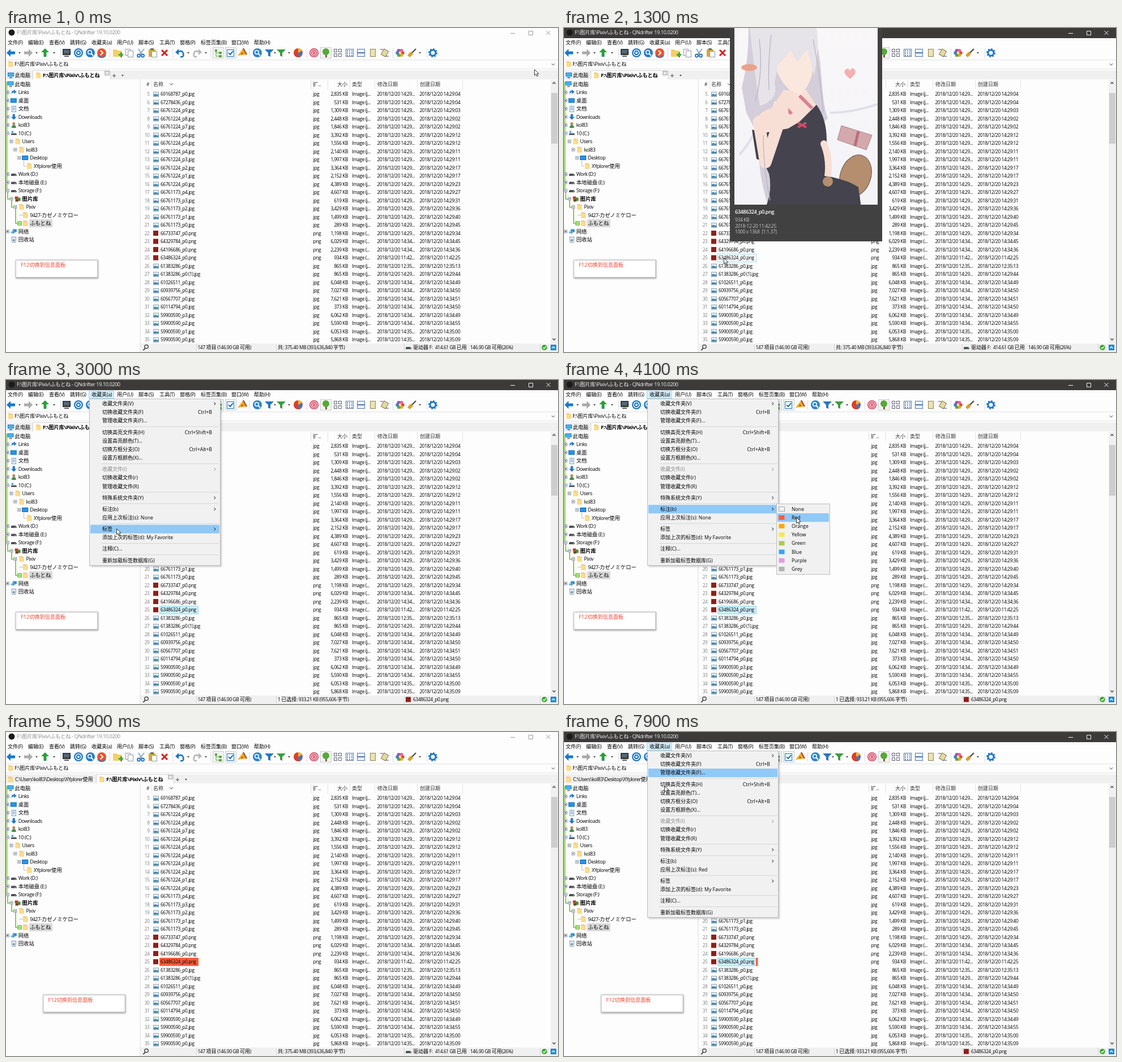
An HTML page that plays this animation: 975x574 px, repeating every 8 s.

```html
<!DOCTYPE html>
<html lang="zh">
<head>
<meta charset="utf-8">
<title>File manager</title>
<style>
html, body { margin: 0; width: 100%; height: 100%; overflow: hidden; background: #fdfdfd; }
svg { display: block; }
text { font-family: "Open Sans", "Noto Sans CJK SC", "Noto Sans CJK", sans-serif; letter-spacing: -.05em; }
text.wide, tspan { letter-spacing: 0; }
</style>
</head>
<body>
<svg id="stage" width="975" height="574" viewBox="0 0 975 574"></svg>
<script>
const LOOP = 8000, STEP = 100;

// ---- drawing helpers; text is placed by its vertical centre ----
const rect = (x, y, w, h, fill, more = '') => `<rect x="${x}" y="${y}" width="${w}" height="${h}" fill="${fill}" ${more}/>`;
const box = (x, y, w, h, fill, stroke, more = '') => rect(x + .5, y + .5, w - 1, h - 1, fill, `stroke="${stroke}" ${more}`);
const dot = (x, y, r, fill, more = '') => `<circle cx="${x}" cy="${y}" r="${r}" fill="${fill}" ${more}/>`;
const line = (d, stroke, w = 1, more = '') => `<path d="${d}" fill="none" stroke="${stroke}" stroke-width="${w}" ${more}/>`;
const fillPath = (d, fill, more = '') => `<path d="${d}" fill="${fill}" ${more}/>`;
const at = (x, y, body, more = '') => `<g transform="translate(${x} ${y}) ${more}">${body}</g>`;
const group = (id, body, more = '') => `<g id="${id}" ${more}>${body}</g>`;
const text = (x, y, s, { size = 8.4, cjk = 9, fill = '#000', anchor = 'start', weight = 400, style = '' } = {}) =>
  `<text class="${style}" x="${x}" y="${y + 3}" font-size="${size}" fill="${fill}" text-anchor="${anchor}" font-weight="${weight}">` +
  s.replace(/[\u3000-\u9fff]+/g, run => `<tspan font-size="${cjk}">${run}</tspan>`) + '</text>';

// ---- small icons, centred on 0,0 ----
const icons = {
  folder: fillPath('M-4-5H1L2-4H4V5H-4Z', '#f2c96c') + fillPath('M-4-3H3V5H-4Z', '#fbdc8c'),
  pc: rect(-5, -5, 11, 7, '#1c7fd0') + rect(-4, -4, 9, 5, '#45b4f2') + rect(-2, 3, 5, 2, '#6c7a86'),
  desktop: rect(-6, -4, 11, 8, '#1467b3') + rect(-5, -3, 9, 6, '#1e96ee'),
  link: fillPath('M-4 4V0Q-4-3 0-3V-5L5-1 0 3V0Q-3 0-4 4Z', '#2b7fd4'),
  doc: box(-4, -5, 8, 11, '#fff', '#7f95a8') + line('M-2-2H2M-2 0H2M-2 2H2', '#4a93d1'),
  down: fillPath('M-2-5H2V0H5L0 5-5 0H-2Z', '#1f78d1'),
  user: dot(0, -2.5, 2.6, '#b98a5a') + fillPath('M-4 5Q-4 0 0 0T4 5Z', '#3f8f4f'),
  drive: fillPath('M-4-1H3L5 1V3H-5V1Z', '#4a4f55') + rect(2, 1, 2, 1, '#8fdc6a'),
  winDrive: rect(-4, -4, 3, 3, '#2f9be8') + fillPath('M-4 0H4L5 1V3H-5V1Z', '#4a4f55'),
  pictures: rect(-5, -4, 6, 5, '#c7382b') + rect(-2, -2, 7, 6, '#4f8d36') + rect(-4, 1, 5, 4, '#7a3b24'),
  net: rect(-2, -4, 7, 5, '#2f8fd8') + fillPath('M-5 0H-1V-2L3 1-1 5V3H-5Z', '#57a7df'),
  bin: fillPath('M-4-5H4L3 5H-3Z', '#dfe7ee', 'stroke="#7d8b99" stroke-width=".8"') + dot(0, 1, 1.7, '#3c86cf'),
  jpg: box(-5, -4, 10, 9, '#dff1fb', '#98a4ad') + fillPath('M-4 3.5V1L-1-.5 1 1 4 .5V3.5Z', '#3b83ad'),
  png: rect(-5, -4.5, 9, 9, '#8d2018')
};
const icon = (name, x, y) => at(x, y, icons[name]);
const caret = (x, y) => fillPath(`M${x - 2} ${y - 1}h4l-2 2.4z`, '#333');
const chevron = (x, y, stroke = '#333') => line(`M${x - 1.5} ${y - 2.5}l2.5 2.5-2.5 2.5`, stroke);
const plus = (x, y, open) => box(x - 3, y - 3, 6, 6, '#fff', '#8c9aa5') +
  line(`M${x - 1.5} ${y}h3` + (open ? '' : `M${x} ${y - 1.5}v3`), '#333', .9);

// ---- window frame ----
const APP = 'QNdrifter 19.10.0200', FOLDER = 'F:\\图片库\\Pixiv\\ふもとね';
const MENU_BAR = [[3, '文件(F)'], [39, '编辑(E)'], [76, '查看(V)'], [113, '跳转(G)'], [151, '收藏夹(a)'], [196, '用户(U)'],
  [234, '脚本(S)'], [271, '工具(T)'], [307, '窗格(P)'], [344, '标签页集(B)'], [398, '窗口(W)'], [438, '帮助(H)']];

const titleBar = (id, bg, ink, buttons) => group(id, rect(0, 0, 975, 18, bg) + dot(10, 8, 5.5, '#1d1b1a') +
  text(19, 8, `${FOLDER} - ${APP}`, { size: 9.2, fill: ink }) +
  line('M891 9.5h8M923.5 5.5h7v7h-7zM954.5 5l7 7m0-7l-7 7', buttons));

function toolbar() {
  const arrow = (x, fill, turn) => at(x, 44, fillPath('M-8 0L-1-7V-2.5H7V2.5H-1V7Z', fill), `rotate(${turn})`);
  const disc = (x, fill, body) => dot(x, 44, 8, fill) + at(x, 44, body);
  const lens = line('M1.5 1.5L5 5', '#fff', 2) + dot(-1, -1, 3.3, 'none', 'stroke="#fff" stroke-width="1.6"');
  const funnel = (x, fill) => fillPath(`M${x - 8} 38h16l-6 6v7l-4-2v-5z`, fill);
  const pressed = x => box(x - 10, 34, 20, 20, '#f1f4f6', '#c9ced2');
  const curve = (x, fill, flip) => at(x, 44, line('M-4-1Q4-6 6 1T1 7', fill, 2.6) + fillPath('M-8-1L-2-7V4Z', fill), `scale(${flip} 1)`);
  let s = arrow(9, '#1679c9', 0) + arrow(39, '#a9abad', 180) + arrow(69, '#2c9c3e', 90);
  s += rect(100, 37, 14, 11, '#333b42') + rect(102, 39, 10, 6, '#566873') + rect(103, 49, 8, 2, '#59636b');
  s += disc(128, '#1c78c8', dot(0, 0, 5, 'none', 'stroke="#fff" stroke-width="1.5"') + dot(0, 0, 2, '#fff'));
  s += disc(149, '#2b7fc4', lens) + disc(169, '#e8552d', line('M-2-4L2 0-2 4', '#fff', 2.2) + line('M-7 4A8 8 0 0 0 7 4', '#2c7cc4', 2));
  s += fillPath('M189 38h6l2 2h7v11h-15z', '#f5cf65') + fillPath('M199 46h3v-3h3v3h2v3h-2v3h-3v-3h-3z', '#39a845');
  s += box(211, 37, 9, 12, '#fff', '#8e9aa5') + box(215, 40, 10, 12, '#fff', '#8e9aa5');
  s += line('M234 37L240 47M244 37L236 47', '#8aa0b4', 1.8) + [234.5, 241.5].map(x => dot(x, 49, 2.5, 'none', 'stroke="#1f6fc0" stroke-width="1.8"')).join('');
  s += rect(252, 38, 12, 13, '#d9a544') + rect(255, 36, 6, 3, '#6d6d6d') + box(257, 41, 10, 11, '#fff', '#8e9aa5');
  s += line('M275 39l10 10m0-10l-10 10', '#d8201c', 3) + curve(307, '#1c74c4', 1) + curve(338, '#b4b6b8', -1);
  s += pressed(375) + rect(369, 38, 4, 4, '#58a832') + rect(376, 42, 5, 4, '#58a832') + rect(376, 48, 5, 4, '#58a832') + line('M371 42v8h5m-5-6h5', '#58a832');
  s += pressed(397) + box(390, 38, 13, 13, '#fff', '#1d6fb8') + line('M393 44l3 3 5-6', '#1d6fb8', 2);
  s += fillPath('M409 49L419 36 425 47Z', '#f0a92f') + line('M419 36L425 47', '#a8551b', 2.4) + dot(417, 45, 1.6, '#cf3c24');
  s += disc(444, '#2c86cf', lens) + funnel(465, '#2277c4') + funnel(486, '#3b9d3d');
  s += dot(516, 44, 8, '#dd3f28') + fillPath('M516 44V36A8 8 0 0 1 523 40Z', '#f6b73c') + fillPath('M516 44L523 41A8 8 0 0 1 518 52Z', '#3c78c4');
  s += [7.2, 4.4, 1.6].map(r => dot(544, 44, r, 'none', 'stroke="#d8405e" stroke-width="1.7"')).join('');
  s += pressed(565) + rect(564, 45, 3, 7, '#8a5a2c') + dot(565, 42, 6, '#58a838');
  s += [579, 587].map(x => [37, 45].map(y => box(x, y, 6, 6, '#f8f8f8', '#667')).join('')).join('');
  s += box(600, 37, 14, 14, '#fff', '#5b7590') + [0, 1, 2].map(i => line(`M602 ${40.5 + i * 4}h10`, '#3d76b4', 2, 'stroke-dasharray="2 2"')).join('');
  s += box(620, 37, 14, 14, '#e9f1fa', '#4a78b4') + rect(620, 43, 14, 2, '#4a78b4') + box(643, 37, 10, 14, '#ece3b0', '#8d8355');
  s += at(669, 44, box(-5, -6, 10, 12, '#e4d9a2', '#857b4e'), 'rotate(30)') + line('M661 38h5m5 12h5', '#444');
  const petals = ['#e2472f', '#f3a71f', '#5ba83b', '#3b7fcc', '#9556b4', '#e25f96'];
  s += petals.map((c, i) => dot(696 + 4.6 * Math.cos(i * 1.047), 44 + 4.6 * Math.sin(i * 1.047), 3.1, c)).join('') + dot(696, 44, 2.4, '#fbe26a');
  s += line('M724 37L716 45', '#5a4a3a', 2.4) + fillPath('M709 48L715 42 719 46 713 52Z', '#d9a02f');
  s += dot(754, 44, 5, 'none', 'stroke="#1c78c8" stroke-width="3"') + dot(754, 44, 7, 'none', 'stroke="#1c78c8" stroke-width="2" stroke-dasharray="2.75 2.75"');
  s += [24, 54, 85, 113, 322, 353, 475, 500, 731].map(x => caret(x, 44)).join('');
  return s + [96, 183, 294, 361, 430, 531, 683, 743].map(x => rect(x, 36, 1, 17, '#dcdcdc')).join('');
}

const tabs = (id, dx, iconName, label, size) => group(id, rect(0, 75, 48 + dx, 16, '#efefef') +
  icon(iconName, 8, 84) + text(16, 84, label, { size }) +
  rect(47 + dx, 75, 138, 17, '#fdfdfd') + line(`M${47.5 + dx} 91V75.5h137V91`, '#d2d2d2') +
  icon('folder', 57 + dx, 84) + text(65 + dx, 84, FOLDER, { size: 9.5, weight: 700 }) +
  box(174 + dx, 76, 9, 8, '#d5d5d5', '#b5b5b5') + line(`M${176.5 + dx} 78l4 4m0-4l-4 4`, '#fff') +
  line(`M${188 + dx} 84.5h6m-3-3v6`, '#555', 1.2) + caret(206 + dx, 84));

// ---- folder tree: icon, label, depth, expander (+, - or blank) ----
const TREE = [['pc', '此电脑', 0, ''], ['link', 'Links', 1, '+'], ['desktop', '桌面', 1, '+'], ['doc', '文档', 1, '+'],
  ['down', 'Downloads', 1, '+'], ['user', 'kol83', 1, '+'], ['winDrive', '10 (C:)', 1, '-'], ['folder', 'Users', 2, '-'],
  ['folder', 'kol83', 3, '-'], ['desktop', 'Desktop', 4, '-'], ['folder', 'XYplorer使用', 5, ''], ['drive', 'Work (D:)', 1, '+'],
  ['drive', '本地磁盘 (E:)', 1, '+'], ['drive', 'Storage (F:)', 1, '-'], ['pictures', '图片库', 2, '-'], ['folder', 'Pixiv', 3, '-'],
  ['folder', '9427-カゼノミケロー', 4, ''], ['folder', 'ふもとね', 4, ''], ['net', '网络', 1, '+'], ['bin', '回收站', 1, '']];

function tree() {
  let s = line('M1.5 95V290M3 290V303H8M10 305V317.5H14M17 320V346H22', '#86d04c', 2) + rect(20, 342, 8, 8, '#86d04c') +
    line('M22 344.5h4m-4 3h4', '#fff') + line('M31.5 235V245H36M24 331.5h6', '#bbb') + rect(41, 339, 41, 14, '#d9d9d9');
  TREE.forEach(([name, label, depth, mark], i) => {
    const x = depth ? 15 + 6.8 * depth : 15.5, y = 99.5 + 14.5 * i;
    if (mark) s += plus(x - 19, y, mark === '-');
    s += icon(name, x - 8, y) + text(x, y, label, { size: 8.8, cjk: 9.3, weight: label === '图片库' ? 700 : 400 });
  });
  return s;
}

// ---- file list: name, KB, creation time ----
const FILES = `69168787_p0.jpg 2,835 14:29:04|67278436_p0.jpg 531 14:29:04|66761224_p9.jpg 1,309 14:29:03|66761224_p8.jpg 2,448 14:29:02
66761224_p7.jpg 1,846 14:29:02|66761224_p6.jpg 3,392 14:29:12|66761224_p5.jpg 1,556 14:29:12|66761224_p4.jpg 2,140 14:29:11
66761224_p3.jpg 1,997 14:29:11|66761224_p2.jpg 3,364 14:29:17|66761224_p1.jpg 2,152 14:29:17|66761224_p0.jpg 4,389 14:29:23
66761173_p4.jpg 4,607 14:29:27|66761173_p3.jpg 619 14:29:31|66761173_p2.jpg 3,429 14:29:36|66761173_p1.jpg 1,499 14:29:40
66761173_p0.jpg 289 14:29:45|66733747_p0.png 1,198 14:29:34|64329784_p0.png 6,029 14:34:45|64196686_p0.png 2,239 14:34:36
63486324_p0.png 934 11:42:25|61383286_p0.jpg 865 12:35:13|61383286_p0 (1).jpg 865 14:29:44|61026511_p0.jpg 6,048 14:34:49
60939756_p0.jpg 7,027 14:34:50|60567707_p0.jpg 7,621 14:34:51|60114794_p0.jpg 373 14:34:50|59900590_p3.jpg 6,062 14:34:49
59900590_p2.jpg 5,590 14:34:55|59900590_p1.jpg 6,053 14:35:00|59900590_p0.jpg 5,868 14:35:09`.split(/[|\n]/);

function fileList() {
  const heads = [[248, '#'], [260, '名称'], [542, '扩...'], [585, '大小'], [611, '类型'], [656, '修改日期'], [731, '创建日期']];
  let s = heads.map(([x, label]) => text(x, 99.5, label, { fill: '#333' })).join('') + line('M289 98l3 3 3-3', '#444') +
    [257, 538, 568, 607, 651, 726, 806].map(x => rect(x, 92, 1, 16, '#e2e2e2')).join('');
  FILES.forEach((row, i) => {
    const [, name, size, time] = row.match(/^(.+) (\S+) (\S+)$/), ext = name.slice(-3), y = 117 + 14.5 * i;
    const date = '2018/12/20 ' + time;
    s += text(253.5, y, `${i + 5}`, { fill: '#808080', anchor: 'end' }) + icon(ext, 265, y) + text(273, y, name) +
      text(542.5, y, ext) + text(604, y, size + ' KB', { anchor: 'end' }) +
      text(611, y, ext === 'jpg' ? 'Image (j...' : 'Image (...') + text(655.5, y, date.slice(0, 16) + '...') + text(730.5, y, date);
  });
  return s + rect(962, 92, 13, 467, '#f0f0f0') + rect(963, 115, 11, 90, '#cdcdcd') +
    line('M965.5 99l2.5-3 2.5 3M965.5 550l2.5 3 2.5-3', '#444', 1.3);
}

const marks = group('hover', box(271, 400, 69, 15, '#fdfdfd', '#a6d8f5')) +
  group('label', rect(271, 400, 69, 14.5, '#fb5b3c')) +
  group('selected', box(271, 400, 69, 15, '#cbeefd', '#9bd6f3')) +
  group('strip', rect(339, 400, 3.5, 14.5, '#f5603f'));

const statusBar = rect(238, 559, 737, 15, '#f0f0f0') +
  dot(248, 564.5, 3.2, 'none', 'stroke="#333" stroke-width="1.3"') + line('M246 567l-3.5 4', '#333', 1.8) +
  [336, 477, 703, 943].map(x => rect(x, 560, 1, 13, '#d6d6d6')).join('') + text(338.5, 566, '147 项目 (146.90 GB 可用)') +
  dot(951, 566, 4.8, '#3fa535') + line('M948.5 566l2 2 3.5-4', '#fff', 1.3) +
  rect(962, 561, 10, 10, '#1f86dc') + line('M964.5 567.5l2.5-3 2.5 3', '#fff', 1.3) +
  group('statusAll', text(480, 566, '共: 375.40 MB (393,636,840 字节)') + icon('drive', 711, 566) +
    text(719, 566, '驱动器 F:') + text(758, 566, '414.61 GB 已用') + text(820, 566, '146.90 GB 可用(26%)')) +
  group('statusOne', text(480, 566, '1 已选择: 933.21 KB (955,606 字节)') + icon('png', 711, 566) + text(719, 566, '63486324_p0.png'));

const note = group('note', rect(17, 411, 146, 33, '#000', 'opacity=".35" filter="url(#soft)"') + box(17, 411, 145, 31, '#fff', '#c8c8c8', 'rx="1"') +
  text(26, 420, 'F12切换到信息面板', { size: 9.2, cjk: 9.1, fill: '#f2402c', style: 'wide' }));

// ---- favourites menu; null is a separator ----
const MENU = [['收藏文件夹(V)', '>'], ['切换收藏文件夹(F)', 'Ctrl+B'], ['管理收藏文件夹(F)...'], null,
  ['切换高亮文件夹(H)', 'Ctrl+Shift+B'], ['设置高亮颜色(T)...'], ['切换方框分支(O)', 'Ctrl+Alt+B'], ['设置方框颜色(X)...'], null,
  ['收藏文件(I)', '>', '#8a8a8a'], ['切换收藏文件(r)'], ['管理收藏文件(R)'], null, ['特殊系统文件夹(Y)', '>'], null,
  ['标注(b)', '>'], ['应用上次标注(s): '], null, ['标签', '>'], ['添加上次的标签(d): My Favorite'], null, ['注释(C)...'], null, ['重新加载标签数据库(G)']];
const LABELS = [['None', '#f0f0f0'], ['Red', '#fb5b34'], ['Orange', '#fba810'], ['Yellow', '#fbe945'],
  ['Green', '#b2c858'], ['Blue', '#34a4f6'], ['Purple', '#e19bdc'], ['Grey', '#b3b3b3']];
const ROW = 15.2, HILITE = '#90c8f6', menuY = [], menuFont = { size: 8.7, style: 'wide' };
const labelY = i => 228.5 + ROW * i;

function menu() {
  let y = 42, s = '';
  for (const item of MENU) {
    if (!item) { s += rect(168, y - 5.5, 208, 1, '#d4d4d4'); y += 4.9; continue; }
    const [label, extra, fill = '#000'] = item;
    menuY.push(y);
    if (label.startsWith('应用')) s += ['None', 'Red'].map(n => group('last' + n, text(170, y, label + n, menuFont))).join('');
    else s += text(170, y, label, { ...menuFont, fill });
    if (extra === '>') s += chevron(369, y, fill);
    else if (extra) s += text(364, y, extra, { ...menuFont, anchor: 'end' });
    y += ROW;
  }
  return group('menu', rect(149, 36, 232, 295, '#000', 'opacity=".2" filter="url(#soft)"') +
    box(147, 33, 232, 296, '#f1f1f1', '#bdbdbd') + group('menuHit', rect(149, -7.6, 228, ROW, HILITE)) + s);
}
const subMenu = group('sub', box(375, 219, 95, 126, '#f1f1f1', '#bdbdbd') + group('subHit', rect(377, -7.6, 91, ROW, HILITE)) +
  LABELS.map(([name, fill], i) => rect(379.5, labelY(i) - 4, 10, 8, fill, i ? '' : 'stroke="#555" stroke-dasharray="1.5 1.5"') +
    text(402, labelY(i), name, menuFont)).join(''));

// ---- preview: faceless figure in flat shapes ----
const grey = { size: 8.6, fill: '#c2c2c2' };
const SKIN = '#f8dfd5', DRESS = '#45434d', round = 'stroke-linecap="round" stroke-linejoin="round"';
const preview = group('preview', rect(293, 0, 269, 378, '#414141') + '<svg x="301" y="0" width="253" height="313" viewBox="301 0 253 313">' +
  rect(301, 0, 253, 313, 'url(#sheet)') + line('M470 150Q510 150 554 135M310 225Q335 195 345 165', '#e0dfe9', 4) +
  // hair behind the body
  fillPath('M326 0H440Q452 40 455 90T466 160L452 172 436 130H372L350 190 362 260 370 313H360Q340 250 345 195L322 150 314 105Q326 60 326 0Z', '#d3ced9') +
  // neck, shoulders, dress
  fillPath('M388 110H428L446 138 440 182H350L336 172Q340 150 366 142Z', SKIN) +
  line('M382 132L402 152M416 120L438 142', '#d88193', 6) +
  fillPath('M332 180L352 186 396 178 416 166 446 136Q464 160 464 200L466 262 520 278 524 313H358Q368 285 362 258L352 236 340 232Z', DRESS) +
  line('M459 205Q470 232 466 262', SKIN, 12, round) +
  line('M344 166L356 238L386 148', SKIN, 21, round) + dot(383, 142, 13, SKIN) +
  line('M413 168l15 8m0-8l-15 8', '#c94f6b', 4) +
  // head and fringe
  fillPath('M366 46Q384 22 440 36Q446 92 418 118Q382 112 366 46Z', '#fae8df') +
  fillPath('M328 0H446Q452 36 442 84L430 38 412 60 400 40 378 66 372 96Q380 128 346 138 338 90 328 0Z', '#e6e3e9') +
  line('M345 20Q352 80 338 130M366 12Q360 60 362 110M440 20Q452 80 458 150M352 190Q352 250 364 305', '#b7b0c2', 1.2) +
  at(327, 70, '<ellipse rx="14" ry="6" fill="#e9a28b"/>') +
  // cushion, lap, gift box, heart
  at(515, 262, '<ellipse rx="27" ry="38" fill="#b58e70" stroke="#63483f"/>', 'rotate(18)') +
  fillPath('M460 262Q500 268 520 282L524 313H456Z', DRESS) + dot(466, 272, 9, '#b58e70') +
  fillPath('M490 173L544 190 534 216 483 198Z', '#d3a9ad', 'stroke="#a7848a"') + line('M520 183L514 209', '#b96f78', 5) +
  fillPath('M505 90Q490 79 498 73 503 70 505 76 508 69 513 73 519 80 505 90Z', '#f3b0b2') + '</svg>' +
  text(302, 326, '63486324_p0.png', { size: 9.2, fill: '#fff', weight: 600 }) + text(302, 340, '934 KB', grey) +
  text(302, 350.5, '2018-12-20 11:42:25', grey) + text(302, 361, '1000 x 1368\u00a0 [1:1.37]', grey));

const cursor = group('cursor', fillPath('M.5 .5V11L3 8.7 4.8 12.6 6.5 11.8 4.8 8H8.2Z', '#fff', 'stroke="#222" stroke-width=".9"'));

const stage = document.getElementById('stage');
stage.innerHTML = `<defs><filter id="soft" x="-10%" y="-20%" width="120%" height="150%"><feGaussianBlur stdDeviation="1.6"/></filter>
  <linearGradient id="sheet" x2="0" y2="1"><stop stop-color="#f9f7f8"/><stop offset="1" stop-color="#f3f3f8"/></linearGradient></defs>` +
  rect(0, 0, 975, 574, '#fdfdfd') + titleBar('idle', '#fdfdfd', '#8f8f8f', '#999') + titleBar('active', '#3d3b3a', '#f2f2f2', '#f2f2f2') +
  group('barHit', box(146, 19, 45, 14, '#d3eefc', '#a5d8f3')) + MENU_BAR.map(([x, s]) => text(x, 26, s, { size: 8.8 })).join('') +
  toolbar() + rect(0, 56, 975, 1, '#e2e2e2') + icon('folder', 8, 64) + text(15, 64, FOLDER, { size: 9.2 }) + line('M964 63l2.5 3 2.5-3', '#444') +
  rect(0, 72, 975, 1, '#e4e4e4') + rect(0, 75, 975, 16, '#f0f0f0') + tabs('tabsA', 0, 'pc', '此电脑', 8.8) +
  tabs('tabsB', 112, 'folder', 'C:\\Users\\kol83\\Desktop\\XYplorer使用', 8.7) +
  tree() + rect(236, 91, 2, 483, '#ececec') + marks + fileList() + statusBar + note + menu() + subMenu + preview + cursor;

// ---- timeline ----
const PATH = [[0, 933, 73], [100, 905, 115], [500, 470, 525], [700, 380, 420], [900, 290, 409], [1000, 282, 407], [1800, 282, 407],
  [1900, 296, 385], [2100, 159, 34], [2200, 159, 34], [2300, 167, 26], [2500, 167, 27], [2800, 200, 318], [3000, 195, 263], [3100, 195, 263],
  [3200, 200, 245], [3300, 202, 228], [3400, 202, 228], [3700, 392, 230], [3800, 406, 229], [3900, 406, 229], [4100, 410, 243], [4400, 410, 243],
  [4800, 440, 400], [5200, 407, 365], [5900, 640, 560], [6300, 470, 480], [6500, 385, 385], [6700, 282, 407], [7000, 282, 407],
  [7400, 167, 26], [7800, 167, 26], [7900, 177, 95], [LOOP, 177, 95]];

function cursorAt(t) {
  const i = PATH.findIndex(p => p[0] > t), [t0, x0, y0] = PATH[i - 1], [t1, x1, y1] = PATH[i];
  const k = (t - t0) / (t1 - t0);
  return [x0 + (x1 - x0) * k, y0 + (y1 - y0) * k];
}

const el = id => document.getElementById(id);
const show = (id, on) => el(id).setAttribute('visibility', on ? 'visible' : 'hidden');
const move = (id, x, y) => el(id).setAttribute('transform', `translate(${x} ${y})`);

function draw(t) {
  const within = (a, b) => t >= a && t < b;
  const [x, y] = cursorAt(t), second = t >= 5900;
  const active = within(500, 5900) || t >= 6200;
  const chosen = within(1400, 5200) || t >= 6800, labelled = t >= 4400;
  const menuOpen = within(2400, 4400) || t >= 7600, subOpen = within(3500, 4400);
  show('idle', !active); show('active', active);
  show('tabsA', !second); show('tabsB', second);
  move('note', second ? 48.5 : 0, second ? 54.5 : 0);
  show('hover', within(900, 1400)); show('selected', chosen);
  show('label', labelled && !chosen); show('strip', labelled && chosen);
  show('statusOne', chosen); show('statusAll', !chosen);
  show('barHit', menuOpen || (x > 146 && x < 190 && y > 19 && y < 33));

  // The highlight trails the pointer on the last quick move.
  const aim = subOpen ? 228.5 : t >= 7900 ? 72 : y;
  const hit = menuY.find(m => Math.abs(m - aim) <= ROW / 2);
  show('menu', menuOpen); show('menuHit', menuOpen && hit !== undefined);
  if (hit !== undefined) move('menuHit', 0, hit);
  show('lastNone', menuOpen && !labelled); show('lastRed', menuOpen && labelled);
  show('sub', subOpen); show('subHit', subOpen && x > 377);
  move('subHit', 0, labelY(Math.max(0, Math.round((y - 228.5) / ROW))));
  show('preview', within(1200, 1400));
  show('cursor', !within(5300, 6000)); move('cursor', x, y);
}

const start = performance.now();
let last = -1;
function tick() {
  const t = Math.floor(((performance.now() - start) % LOOP) / STEP) * STEP;
  if (t !== last) draw(last = t);
  requestAnimationFrame(tick);
}
tick();
</script>
</body>
</html>
```
